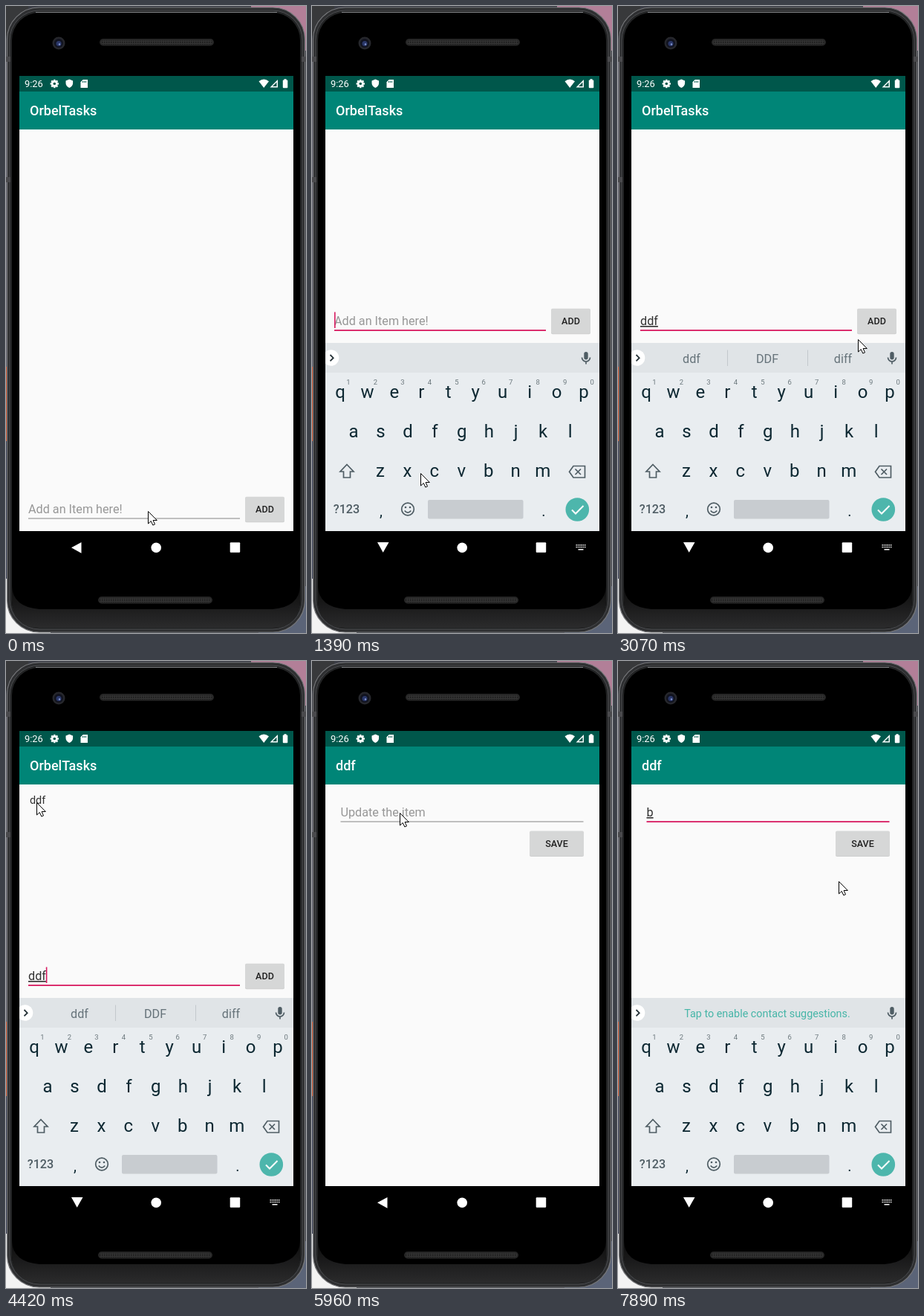
These frames come from a looping animation (404 by 843 pixels, 8 s). An HTML page:

```html
<!DOCTYPE html>
<html lang="en">
<head>
<meta charset="utf-8">
<title>Todo app demo</title>
<style>
  html, body { margin: 0; width: 100%; height: 100%; overflow: hidden; background: #000; }
  svg { display: block; width: 404px; height: 843px; }
  text { font-family: Roboto, Arial, sans-serif; white-space: pre; }
  .mid { text-anchor: middle; }
  .bold { font-weight: 500; }
  .key { font-size: 24px; fill: #0d2832; text-anchor: middle; }
  .digit { font-size: 9.5px; fill: #6c787d; text-anchor: middle; }
  .word { font-size: 16.2px; fill: #66737a; text-anchor: middle; }
  .typed { text-decoration: underline; text-decoration-thickness: 1px; }
  .line { fill: none; stroke: #4f5d64; stroke-width: 1.7; }
</style>
</head>
<body>
<svg id="stage" viewBox="0 0 404 843" xmlns="http://www.w3.org/2000/svg"></svg>
<script>
const LOOP = 8000;
const PINK = '#d81b60';
const EDIT_Y = 191;

const text = (x, y, size, fill, str, cls = '', id = '') =>
  `<text x="${x}" y="${y}" font-size="${size}" fill="${fill}" class="${cls}" ${id && `id="${id}"`}>${str}</text>`;
const rect = (x, y, w, h, fill, rx = 0, extra = '') =>
  `<rect x="${x}" y="${y}" width="${w}" height="${h}" rx="${rx}" fill="${fill}" ${extra}/>`;
const circle = (x, y, r, fill, extra = '') => `<circle cx="${x}" cy="${y}" r="${r}" fill="${fill}" ${extra}/>`;
const path = (d, fill, extra = '') => `<path d="${d}" fill="${fill}" ${extra}/>`;
const group = (id, body, extra = '') => `<g id="${id}" ${extra}>${body}</g>`;
const fade = (id, top, bottom) => `<linearGradient id="${id}" x2="0" y2="1">
  <stop stop-color="${top}"/><stop offset="1" stop-color="${bottom}"/></linearGradient>`;

const button = (id, x, y, w, label) =>
  rect(x, y + 1, w, 33.5, '#bfc0c0', 2, 'opacity=".75"') +
  rect(x, y, w, 33.5, '#d6d7d7', 2, `id="${id}"`) +
  text(x + w / 2, y + 21.2, 12.57, '#212121', label, 'mid bold');

// Text field: baseline at y + 18, underline at y + 25.
const field = (id, x, y, w, hint) =>
  text(x, y + 18, 16.2, '#979797', hint, '', id + 'Hint') +
  text(x, y + 18, 16.2, '#303030', '', 'typed', id + 'Text') +
  rect(x, y + 24.5, w, 1, '#858585', 0, `id="${id}Line"`) +
  rect(x, y + 0.5, 1.6, 21.5, PINK, 0, `id="${id}Caret"`);

function backdrop() {
  return rect(0, 0, 404, 843, '#3b3d45') +
    rect(0, 0, 30, 40, '#38393b') + rect(330, 0, 74, 60, '#b27f98') +
    rect(0, 70, 3, 415, '#62636f') + rect(0, 485, 3, 100, '#d8562c') +
    rect(0, 585, 3, 185, '#343a52') + rect(0, 770, 60, 73, '#f3f3f3') +
    rect(340, 780, 64, 63, '#5b6478');
}

const grille = (x, y) => rect(x, y, 154, 9.5, '#262626', 4.7) + rect(x + 2, y + 2, 150, 5.5, 'url(#mesh)', 2.7);

function phone() {
  return rect(1.5, 2, 401, 840, '#2e2f31', 43, 'stroke="#77787b" stroke-width="1.2"') +
    rect(5, 6, 394, 832, '#222324', 40, 'stroke="#4b4c4f"') +
    rect(8, 9, 388, 827, '#000', 37) +
    path('M8 780Q9 808 45 811H359Q395 808 396 780V799Q394 836 359 836H45Q10 836 8 799z', 'url(#chin)') +
    path('M40 8.5H365', 'none', 'stroke="#85878a"') +
    [[0, 68], [0, 230], [398, 68]].map(([x, y]) => rect(x, y, 6, 7, '#4a4a4d')).join('') +
    circle(71, 50, 8.5, '#26272c') + circle(71, 50, 6, '#11131f') +
    circle(71, 50.5, 3.5, '#2a3768') + circle(72, 51.5, 1.2, '#8396cf') +
    grille(126, 44) + grille(124, 794);
}

function statusBar() {
  const teeth = Array.from({ length: 8 }, (_, i) =>
    rect(64.1, 98.8, 2.4, 3, '#fff', 0, `transform="rotate(${i * 45} 65.3 104.5)"`)).join('');
  return rect(18, 94, 369, 21, '#00574b') + text(25, 109, 12.9, '#fff', '9:26') +
    teeth + circle(65.3, 104.5, 4.5, '#fff') + circle(65.3, 104.5, 1.8, '#00574b') +
    path('M85.3 98.5l4.8 2v3.3c0 3-2 5.2-4.8 6.2-2.8-1-4.8-3.2-4.8-6.2v-3.3z', '#fff') +
    path('M103.7 99H110V110H100.5V102.2z', '#fff') +
    path('M103.5 101v2M105.5 101v2M107.5 101v2', 'none', 'stroke="#00574b"') +
    path('M340.5 101.3Q347.2 95.5 354 101.3L347.2 110z', '#fff') +
    path('M366 99V109.5H355.5z', '#fff') + path('M364.5 102.5V108H359z', '#00574b') +
    rect(372.8, 99.5, 6.5, 10.8, '#fff', 1) + rect(374.5, 98.2, 3, 2, '#fff');
}

const appScreen = title => rect(18, 115, 369, 592, '#fafafa') +
  rect(18, 115, 369, 51, '#008577') + text(32, 147, 18, '#fff', title, 'bold');

function listScreen() {
  return appScreen('OrbelTasks') +
    text(32, 192.3, 14.4, '#303030', 'ddf', '', 'item') +
    group('entry', field('add', 30, 411, 285, 'Add an Item here!') + button('addBtn', 322, 406.8, 53, 'ADD'));
}

function editScreen() {
  return appScreen('ddf') +
    field('edit', 38.5, EDIT_Y, 327, 'Update the item') + button('saveBtn', 293, 228.6, 73, 'SAVE');
}

function keyboard() {
  const row = (letters, x0, y, cls = 'key') => [...letters].map((c, i) =>
    `<text class="${cls}" x="${x0 + i * 36.45}" y="${y}">${c}</text>`).join('');
  const words = [99, 201, 303].map((x, i) => `<text class="word" id="word${i}" x="${x}" y="479.5"></text>`).join('');
  return rect(18, 453, 369, 254, '#e9edf0') + rect(18, 453, 369, 40, '#e0e4e7') +
    circle(25.5, 473, 10.8, '#fff') +
    path('M24.5 469l4.2 4.2-4.2 4.2', 'none', 'stroke="#263238" stroke-width="1.8"') +
    group('words', path('M147.5 462.5V484M255.5 462.5V484', 'none', 'stroke="#c3c8cc"') + words) +
    text(201, 479, 14.37, '#45b5a7', 'Tap to enable contact suggestions.', 'mid', 'tip') +
    rect(366.3, 465, 5.4, 10.5, '#4f5d64', 2.7) +
    path('M363.5 472.5a5.5 5.5 0 0 0 11 0M369 478v3.5', 'none', 'class="line"') +
    row('qwertyuiop', 38, 527) + row('asdfghjkl', 56, 580) + row('zxcvbnm', 92, 633) +
    row('1234567890', 49, 509, 'digit') +
    path('M47 616.5l9 9.5h-4.5v8h-9v-8h-4.5z', 'none', 'class="line"') +
    path('M352 618.5h15.5v15.5H352l-5.5-7.75zM354.5 622.5l7.5 7.5M362 622.5l-7.5 7.5', 'none', 'class="line"') +
    text(46.5, 682, 16.2, '#4f5d64', '?123', 'mid bold') +
    text(93, 685.5, 20, '#0d2832', ',', 'mid') + text(312, 685.5, 20, '#0d2832', '.', 'mid') +
    circle(129, 676.5, 8.3, 'none', 'class="line"') +
    circle(126, 674, 1.3, '#4f5d64') + circle(132, 674, 1.3, '#4f5d64') +
    path('M124.7 678.5q4.3 5.4 8.6 0', 'none', 'class="line"') +
    rect(156, 664, 128.5, 25.5, '#c8ccd0', 2) +
    circle(357.3, 677, 15.8, '#4db6ac') +
    path('M350 677.5l5 5 10.5-10.5', 'none', 'stroke="#fff" stroke-width="2"');
}

function navBar() {
  const dots = Array.from({ length: 12 }, (_, i) =>
    rect(355.5 + i % 6 * 2.3, 724 + Math.floor(i / 6) * 2.8, 1.4, 1.5, '#fff')).join('');
  return path('M88 728.3L101.5 721V735.7z', '#fff', 'id="back"') +
    group('hide', path('M88 721H103.5L95.7 734.8z', '#fff') + dots + rect(358.5, 730, 7, 1.5, '#fff')) +
    circle(202.2, 728.2, 6.8, '#fff') + rect(301.7, 721.3, 13.5, 13.5, '#fff', 1);
}

const pointer = path('M0 0V16.5L3.8 13 6.3 18.5 9 17.4 6.6 12H11.8z', '#fff',
  'id="pointer" stroke="#000" stroke-width="1" stroke-linejoin="round"');

document.getElementById('stage').innerHTML =
  `<defs><clipPath id="screen"><rect x="18" y="94" width="369" height="612"/></clipPath>
   ${fade('chin', '#0c0c0c', '#2b2b2c')}
   <pattern id="mesh" width="3" height="3" patternUnits="userSpaceOnUse">
   <rect width="3" height="3" fill="#333"/><rect width="1.5" height="1.5" fill="#161616"/></pattern></defs>` +
  backdrop() + phone() +
  group('view', group('list', listScreen()) + group('edit', editScreen()) +
    group('keys', keyboard()) + statusBar(), 'clip-path="url(#screen)"') +
  navBar() + pointer;

const ui = Object.fromEntries([...document.querySelectorAll('[id]')].map(el => [el.id, el]));

// Bursts of screen updates: start, end, number of updates.
const bursts = [[150, 990, 7], [1270, 2260, 9], [2410, 3310, 8], [3460, 4420, 8],
  [4850, 5810, 8], [5960, 6930, 8], [7080, 7890, 7]];

// Pointer path: time, x, y.
const track = [[0, 191, 679], [850, 191, 679], [1270, 172, 655], [1393, 146, 628], [1640, 131, 577],
  [2140, 131, 577], [2400, 166, 578], [2540, 166, 578], [3053, 323, 448], [3310, 345, 423],
  [3597, 345, 423], [4420, 41, 190], [4987, 41, 190], [5398, 116, 208], [5810, 118, 204],
  [6098, 118, 204], [6930, 246, 624], [7215, 246, 624], [7890, 297, 296]];

const start = { focus: false, up: false, keys: null, value: '', words: '', item: false,
  press: false, caret: false, edit: 0, tip: false };
const steps = [
  [430, { focus: true, caret: true }],
  [850, { up: true }],
  [1270, { keys: 130 }],
  [1390, { keys: 0 }],
  [1640, { value: 'd', words: 'd D do' }],
  [2010, { value: 'dd', words: 'dd DD did' }],
  [2410, { value: 'ddf', words: 'ddf DDF diff' }],
  [2920, { caret: false }],
  [3460, { press: true, caret: true }],
  [3590, { press: false, item: true }],
  [3860, { caret: false }],
  [4410, { caret: true }],
  [4980, { edit: 0.6, keys: null, up: false, focus: false, caret: false, value: '', words: '' }],
  [5120, { edit: 1 }],
  [6090, { focus: true, caret: true }],
  [6230, { up: true, keys: 130, tip: true }],
  [6370, { keys: 0 }],
  [6500, { caret: false }],
  [6920, { caret: true }],
  [7210, { value: 'b' }],
  [7740, { caret: false }]
];

// Time of the latest screen update.
function snap(t) {
  let out = 0;
  for (const [from, to, n] of bursts) {
    if (t < from) break;
    const gap = (to - from) / (n - 1);
    out = Math.min(to, from + Math.floor((t - from + 8) / gap) * gap);
  }
  return out;
}

function pointerAt(t) {
  const i = track.findIndex(p => p[0] > t);
  if (i < 0) return track[track.length - 1].slice(1);
  const [t0, x0, y0] = track[i - 1], [t1, x1, y1] = track[i];
  const k = (t - t0) / (t1 - t0);
  return [Math.round(x0 + (x1 - x0) * k), Math.round(y0 + (y1 - y0) * k)];
}

const show = (el, on) => el.setAttribute('visibility', on ? 'inherit' : 'hidden');

function drawField(id, x, y, s, active) {
  const value = active ? s.value : '', focus = active && s.focus;
  ui[id + 'Text'].textContent = value;
  show(ui[id + 'Hint'], !value);
  const line = ui[id + 'Line'];
  line.setAttribute('fill', focus ? PINK : '#858585');
  line.setAttribute('height', focus ? 1.8 : 1);
  line.setAttribute('y', y + (focus ? 24.2 : 24.5));
  const width = [...value].reduce((sum, c) => sum + (c === 'f' ? 5.6 : 9.1), 0);
  ui[id + 'Caret'].setAttribute('x', x + width);
  show(ui[id + 'Caret'], focus && s.caret);
}

function draw(time) {
  const t = snap(time);
  const s = Object.assign({}, start, ...steps.filter(p => p[0] <= t).map(p => p[1]));
  const editing = s.edit > 0;
  drawField('add', 30, 411, s, !editing);
  drawField('edit', 38.5, EDIT_Y, s, editing);
  ui.entry.setAttribute('transform', `translate(0 ${s.up || editing ? 0 : 253})`);
  show(ui.item, s.item);
  ui.addBtn.setAttribute('fill', s.press ? '#bcbdbd' : '#d6d7d7');
  show(ui.edit, editing);
  ui.edit.setAttribute('opacity', s.edit);
  ui.edit.setAttribute('transform', `translate(0 ${(1 - s.edit) * 40})`);
  show(ui.keys, s.keys !== null);
  ui.keys.setAttribute('transform', `translate(0 ${s.keys || 0})`);
  show(ui.words, s.keys !== null && s.words);
  s.words.split(' ').forEach((w, i) => ui['word' + i].textContent = w);
  show(ui.tip, s.keys !== null && s.tip);
  show(ui.back, !s.up);
  show(ui.hide, s.up);
  ui.pointer.setAttribute('transform', `translate(${pointerAt(t).map(v => v + 0.5)})`);
}

const begin = performance.now();
function tick() {
  draw((performance.now() - begin) % LOOP);
  requestAnimationFrame(tick);
}
tick();
</script>
</body>
</html>
```
